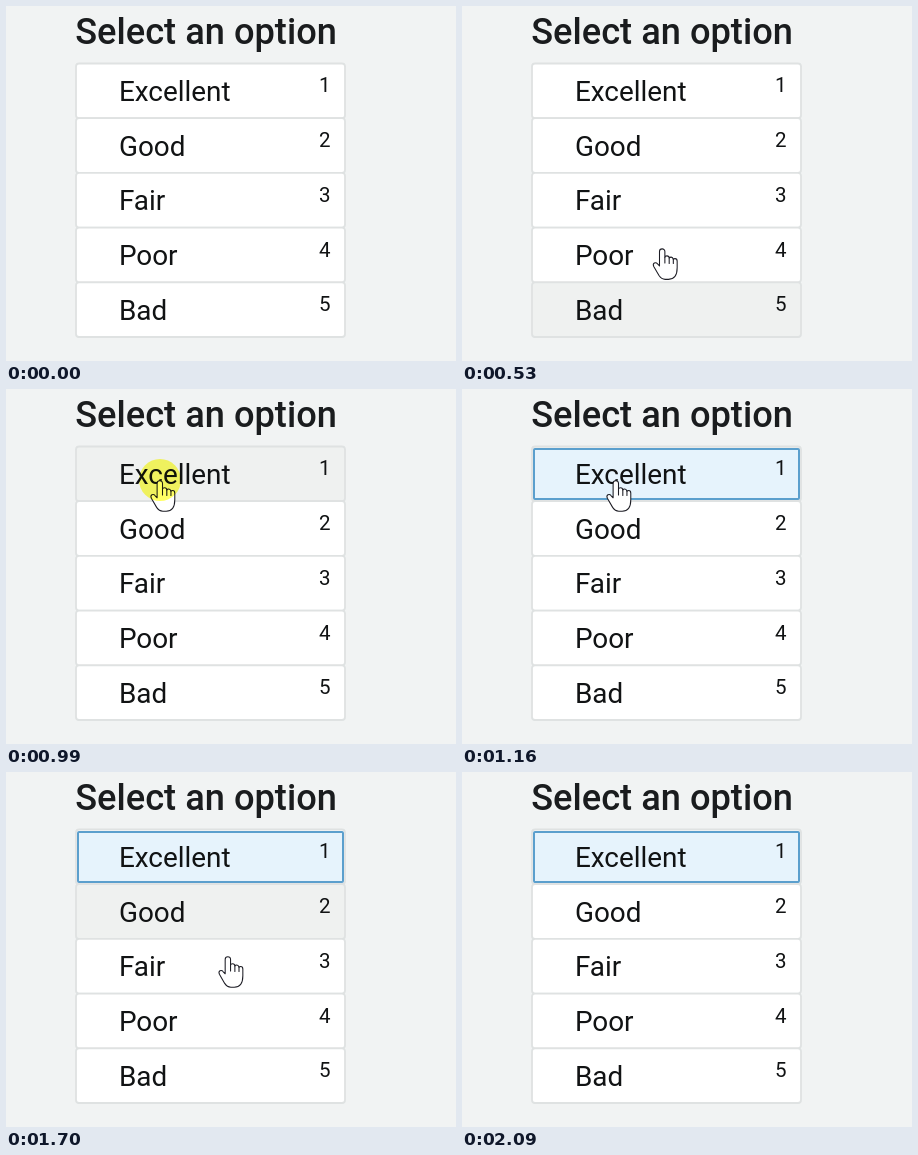
Animation, 450 px wide and 355 px high, one loop 3000 ms. Source, as an HTML page:

```html
<!DOCTYPE html>
<html lang="en">
<head>
<meta charset="utf-8">
<title>Select an option</title>
<style>
  html, body { margin: 0; width: 100%; height: 100%; overflow: hidden; background: #f1f3f3; }
  svg { display: block; }
  text { font: 27.9px Roboto, sans-serif; fill: #111314; }
  .title { font-size: 36.2px; font-weight: 500; fill: #1a1c1e; }
  .key { font-size: 20.5px; }
  .row { fill: #fff; stroke: #dfe2e2; stroke-width: 1.8; }
  .row.hover { fill: #eff1f0; }
  #selected { fill: #e6f3fc; stroke: #5b9fcd; stroke-width: 2; }
  #click { fill: #ffff64; mix-blend-mode: multiply; }
  .cursor { fill: #fff; stroke: #1c1c24; stroke-width: 1.1; stroke-linejoin: round; stroke-linecap: round; }
</style>
</head>
<body>
<svg width="450" height="355" viewBox="0 0 450 355">
  <text class="title" x="69.2" y="38">Select an option</text>
  <g id="rows"></g>
  <rect id="selected" x="72" y="60" width="265" height="50" rx="1"/>
  <g id="labels"></g>
  <g id="hand" class="cursor">
    <g transform="translate(0 .5) scale(.96)">
      <path d="M-3 18V3a2.8 2.8 0 0 1 5.6 0V9q0-1.5 2.2-1.5t2.3 2.3q.5-1 2.1-1t2.2 2.3q.4-.7 1.8-.7 2.2 0 2.2 2.8V20q0 12-9 12H3q-4 0-6.5-4L-9 18.5q-1.2-2.6.6-3.6 2-.8 3.4 1z"/>
      <path fill="none" d="M2.6 9v6M7.1 10v5.5M11.4 11v4.5"/>
    </g>
  </g>
  <path id="arrow" class="cursor" d="M.6.8V25l5.6-5.4L10 28.6l3.8-1.6L10 18.2h7.6z"/>
  <circle id="click" cx="154" cy="91" r="21"/>
</svg>
<script>
const LOOP = 3000, FRAME = 76, HOVER_LAG = 40;
const ENTER = 380, ARRIVE = 840, CLICK = 990, SELECT = 1160, DEPART = 1540, EXIT = 2010, LEAVE = 2090;
const TOP = 57.5, PITCH = 54.7, LEFT = 70, WIDTH = 269;
const options = ['Excellent', 'Good', 'Fair', 'Poor', 'Bad'];

const $ = id => document.getElementById(id);
const show = (id, visible) => $(id).setAttribute('visibility', visible ? 'visible' : 'hidden');
const mix = (a, b, p) => a + (b - a) * p;

function add(parent, tag, attributes, content = '') {
  const node = document.createElementNS('http://www.w3.org/2000/svg', tag);
  for (const name in attributes) node.setAttribute(name, attributes[name]);
  node.textContent = content;
  return $(parent).appendChild(node);
}

const rows = options.map((label, i) => {
  const y = i * PITCH;
  add('labels', 'text', { x: 112.9, y: 95 + y }, label);
  add('labels', 'text', { x: 312.9, y: 86.45 + y, class: 'key' }, i + 1);
  return add('rows', 'rect', { x: LEFT, y: TOP + y, width: WIDTH, height: PITCH, rx: 3, class: 'row' });
});

// The pointer sweeps in along a curve, rests on the first row, then leaves at a steady pace.
function pointerAt(t) {
  if (t < ENTER || t >= LEAVE) return null;
  if (t < DEPART) {
    const rest = Math.max(0, (ARRIVE - t) / (ARRIVE - ENTER)) ** 2.3;
    return { x: mix(154, 285, rest ** 2.5), y: mix(91, 320, rest) };
  }
  const p = Math.min(1, (t - DEPART) / (EXIT - DEPART));
  return { x: mix(172, 366, p ** 1.2), y: mix(106, 334, p ** 0.95) };
}

function sampled(t) {
  const start = t < DEPART ? ENTER : DEPART;
  return start + Math.floor((t - start) / FRAME) * FRAME;
}

const inList = point => point && point.x < LEFT + WIDTH;

function draw(now) {
  const t = now % LOOP;
  const time = sampled(t);
  const pointer = t < LEAVE && pointerAt(time);
  const hover = pointer && pointerAt(time - HOVER_LAG);
  const hovered = inList(hover) ? Math.floor((hover.y - TOP) / PITCH) : -1;
  if (pointer) {
    for (const id of ['hand', 'arrow']) $(id).setAttribute('transform', `translate(${pointer.x} ${pointer.y})`);
  }
  show('hand', inList(pointer));
  show('arrow', pointer && !inList(pointer));
  show('click', t >= CLICK && t < SELECT);
  show('selected', t >= SELECT);
  rows.forEach((row, i) => row.classList.toggle('hover', i === hovered));
}

const begin = performance.now();
function tick() {
  draw(performance.now() - begin);
  requestAnimationFrame(tick);
}
tick();
</script>
</body>
</html>
```
